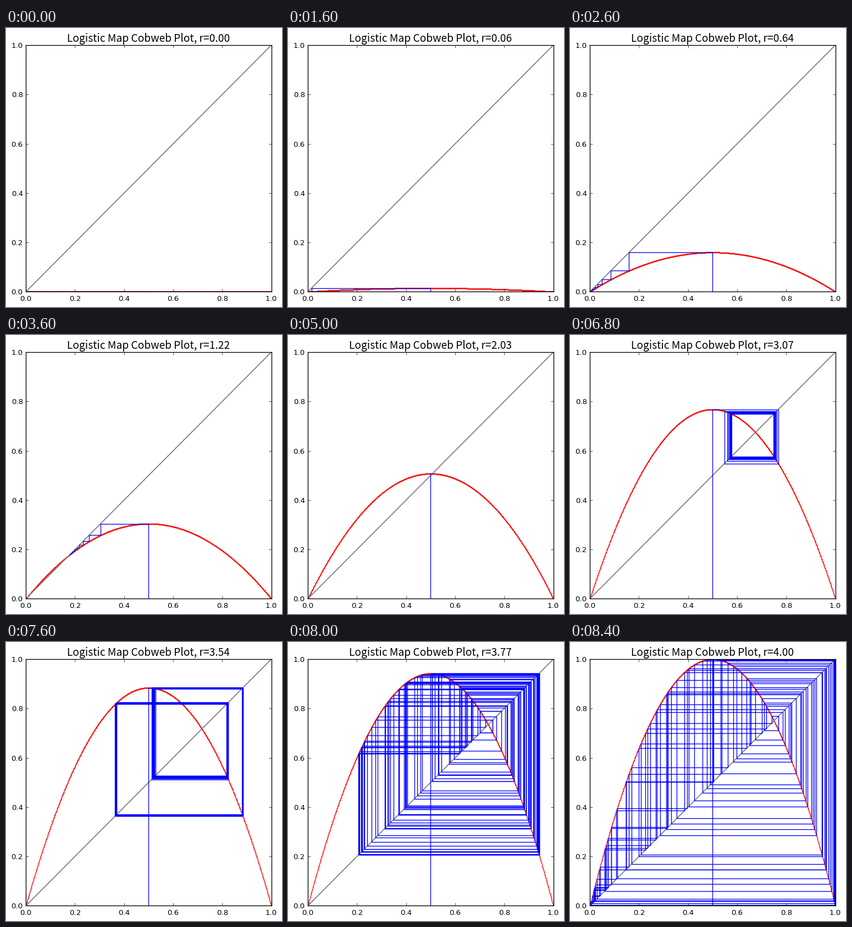
Recreate the animation shown at these times as a matplotlib script. Size 502 by 505 pixels, loop 10000 ms.

```python
import numpy as np
import matplotlib.pyplot as plt
from matplotlib.animation import FuncAnimation

WIDTH, HEIGHT, DPI = 502, 505, 96
LEFT, BOTTOM, SIDE = 36.2, 27.6, 446.4   # axes box in pixels

INTERVAL = 100
HOLD = 16                                # ticks spent on the first and last rate
RATES = np.linspace(0, 3.999, 70)        # just below 4, where the orbit of 0.5 dies
FRAMES = len(RATES) + 2 * (HOLD - 1)
STEPS = 100
X0 = 0.5


def logistic(x, rate):
    return rate * x * (1 - x)


def cobweb(rate):
    x = X0
    points = [(x, 0)]
    for _ in range(STEPS):
        y = logistic(x, rate)
        points += [(x, y), (y, y)]
        x = y
    return np.array(points).T


plt.rcParams["font.family"] = "DejaVu Sans"
fig = plt.figure(figsize=(WIDTH / DPI, HEIGHT / DPI), dpi=DPI, facecolor="white")
ax = fig.add_axes([LEFT / WIDTH, BOTTOM / HEIGHT, SIDE / WIDTH, SIDE / HEIGHT])
ax.set(xlim=(0, 1), ylim=(0, 1))
ax.set_xticks(np.linspace(0, 1, 6))
ax.set_yticks(np.linspace(0, 1, 6))
ax.tick_params(direction="in", length=4, width=0.5, top=True, right=True,
               labelsize=10, pad=4)
ax.tick_params(axis="x", pad=4.6)
for spine in ax.spines.values():
    spine.set_linewidth(1)

title = fig.text((LEFT + SIDE / 2) / WIDTH, 1 - 24.6 / HEIGHT, "",
                 family="Noto Sans CJK JP", size=14.4,
                 ha="center", va="baseline")

xs = np.linspace(0, 1, 1000)
curve = ax.scatter(xs, 0 * xs, s=2, color="red", linewidths=0, zorder=1)
ax.plot([0, 1], [0, 1], color="gray", lw=1.35)
web, = ax.plot([], [], color="blue", lw=1)


def draw(frame):
    rate = RATES[min(max(frame - HOLD + 1, 0), len(RATES) - 1)]
    title.set_text(f"Logistic Map Cobweb Plot, r={rate:.2f}")
    curve.set_offsets(np.column_stack([xs, logistic(xs, rate)]))
    web.set_data(*cobweb(rate))
    return title, curve, web


anim = FuncAnimation(fig, draw, frames=FRAMES, interval=INTERVAL,
                     repeat=True, repeat_delay=0)
plt.show()
```
